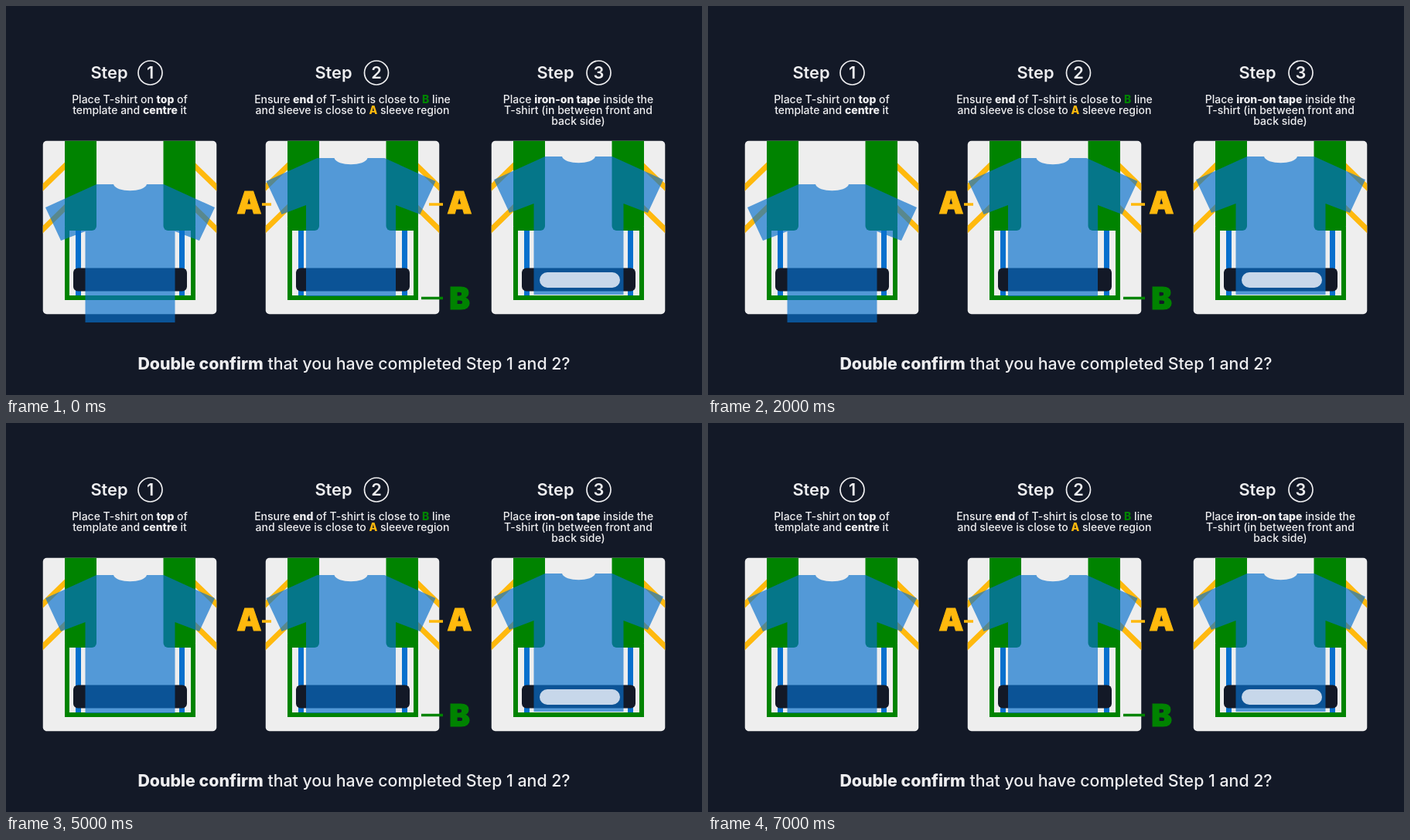
These frames come from a looping animation (900 by 504 pixels, 8 s). An HTML page:

```html
<!DOCTYPE html>
<html lang="en">
<head>
<meta charset="utf-8">
<title>T-shirt steps</title>
<style>
  html, body { margin: 0; height: 100%; overflow: hidden; background: #131927; }
  svg { display: block; width: 900px; height: 504px; font-family: Inter, sans-serif; font-weight: 500; fill: #eeeef0; }
  text { text-anchor: middle; }
  .bold { font-weight: 800; }
  .title { font-size: 21.8px; font-weight: 600; }
  .desc { font-size: 14px; font-weight: 550; }
  .confirm { font-size: 21.3px; font-weight: 550; }
  .label { font-size: 40px; font-weight: 900; stroke-width: 1.2; }
  .yellow { fill: #ffb90d; }
  .green { fill: #008300; }
  .label .yellow { stroke: #ffb90d; }
  .label .green { stroke: #008300; }
</style>
</head>
<body>
<svg viewBox="0 0 900 504">
  <defs>
    <clipPath id="card"><rect x="-.25" y="174.750" width="224.500" height="224.500" rx="5"/></clipPath>
    <g id="template" clip-path="url(#card)">
      <rect x="-1" y="174" width="226" height="226" fill="#eee"/>
      <path d="M-4 238.500L34 201.500M-4 293L40 250M228 238.500L190 201.500M228 293L184 250" stroke="#ffb90d" stroke-width="7"/>
      <path d="M45.5 288V376M179.5 288V376" stroke="#0870cd" stroke-width="7"/>
      <g class="green">
        <rect x="28" y="165" width="41" height="126" rx="6"/>
        <rect x="155.500" y="165" width="41.500" height="126" rx="6"/>
      </g>
      <path d="M31 286V378H194V286" fill="none" stroke="#008300" stroke-width="6"/>
      <rect x="39" y="339.500" width="147" height="30" rx="6" fill="#131927"/>
    </g>
    <path id="shirt" fill="#0870cd" fill-opacity=".67"
      d="M69 197H91C94 208 131 208 134 197H156L222 227L202 270L170.500 258V376H54.500V258L23 270L3 227Z"/>
  </defs>
  <g id="steps"></g>
  <rect x="690" y="345" width="104" height="20" rx="10" fill="#c7d7ea"/>
  <path d="M331 257H343M547 257H565" stroke="#ffb90d" stroke-width="3.5"/>
  <path d="M537 378.500H565" stroke="#008300" stroke-width="3.5"/>
  <g class="label">
    <text class="yellow" x="314.500" y="269">A</text>
    <text class="yellow" x="586.500" y="269">A</text>
    <text class="green" x="586.500" y="393">B</text>
  </g>
  <text class="confirm" x="450" y="470.500"><tspan class="bold">Double confirm</tspan> that you have completed Step 1 and 2?</text>
</svg>
<script>
const bold = (s, color = '') => `<tspan class="bold ${color}">${s}</tspan>`;

const steps = [
  { left: 48, title: 133.5, circle: 186.5, center: 160, dx: 0, dy: 0,
    lines: [`Place T-shirt on ${bold('top')} of`, `template and ${bold('centre')} it`] },
  { left: 336, title: 423.5, circle: 479, center: 448, dx: -2.5, dy: 0,
    lines: [`Ensure ${bold('end')} of T-shirt is close to ${bold('B', 'green')} line`,
            `and sleeve is close to ${bold('A', 'yellow')} sleeve region`] },
  { left: 628, title: 710.5, circle: 766.5, center: 740, dx: 0, dy: -2,
    lines: [`Place ${bold('iron-on tape')} inside the`, 'T-shirt (in between front and', 'back side)'] },
];

document.getElementById('steps').innerHTML = steps.map((s, i) => `
  <text class="title" x="${s.title}" y="93.500">Step</text>
  <circle cx="${s.circle}" cy="86.500" r="15.5" fill="none" stroke="#eeeef0" stroke-width="1.7"/>
  <text class="title" x="${s.circle}" y="93.500">${i + 1}</text>
  ${s.lines.map((line, n) => `<text class="desc" x="${s.center}" y="${125.5 + 14.2 * n}">${line}</text>`).join('')}
  <use href="#template" x="${s.left}"/>
  <use class="shirt" href="#shirt" x="${s.left + s.dx}" y="${s.dy}"/>`).join('');

const movingShirt = document.querySelector('.shirt');
const start = performance.now();

// The first shirt jumps between its low and aligned positions every second.
function draw() {
  const time = (performance.now() - start) % 8000;
  movingShirt.setAttribute('y', Math.floor(time / 1000) % 2 ? 0 : 34);
  requestAnimationFrame(draw);
}
draw();
</script>
</body>
</html>
```
